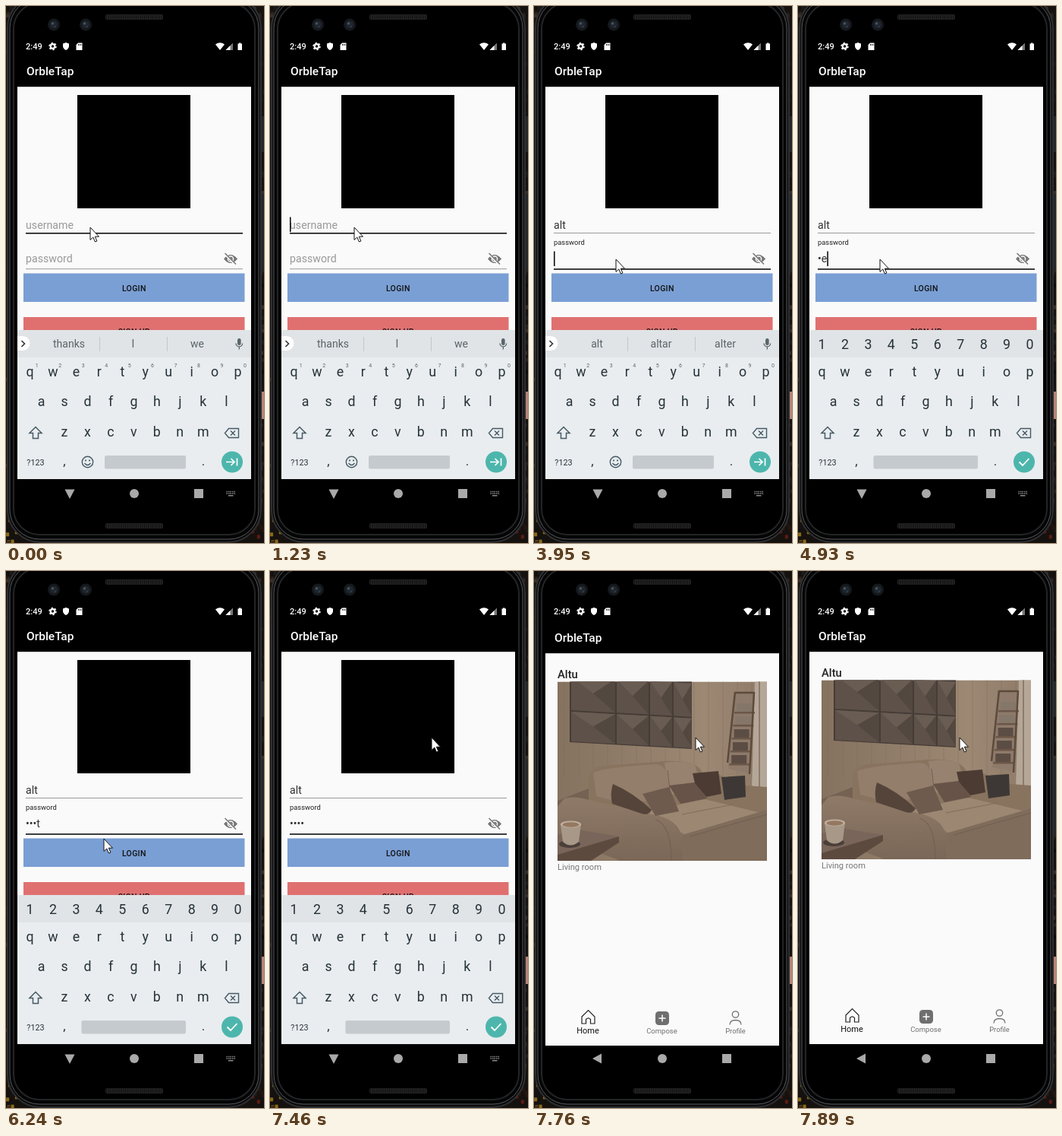
Animation, 340 px wide and 706 px high, one loop 8000 ms. Source, as an HTML page:

```html
<!DOCTYPE html>
<html lang="en">
<head>
<meta charset="utf-8">
<style>
html, body { margin: 0; width: 100%; height: 100%; overflow: hidden; background: #000; }
svg { display: block; width: 340px; height: 706px; font-family: Roboto, sans-serif; }
</style>
</head>
<body>
<svg id="stage" viewBox="0 0 340 706"></svg>
<script>
const LOOP = 8000;
const APP = 'OrbleTap', USER = 'Altu';
const stage = document.getElementById('stage');

const rect = (x, y, w, h, fill, more = '') =>
  `<rect x="${x}" y="${y}" width="${w}" height="${h}" fill="${fill}" ${more}/>`;
const circle = (x, y, r, fill, more = '') => `<circle cx="${x}" cy="${y}" r="${r}" fill="${fill}" ${more}/>`;
const ellipse = (x, y, rx, ry, fill) => `<ellipse cx="${x}" cy="${y}" rx="${rx}" ry="${ry}" fill="${fill}"/>`;
const path = (d, fill, more = '') => `<path d="${d}" fill="${fill}" ${more}/>`;
const line = (d, color, width = 1, more = '') =>
  path(d, 'none', `stroke="${color}" stroke-width="${width}" ${more}`);
const text = (x, y, size, str, fill, more = '') =>
  `<text x="${x}" y="${y}" font-size="${size}" fill="${fill}" ${more}>${str}</text>`;
const label = (x, y, size, str, fill, more = '') =>
  text(x, y, size, str, fill, `text-anchor="middle" ${more}`);
const group = (id, body) => `<g id="${id}">${body}</g>`;
const MEDIUM = 'font-weight="500"';

// Dark speckled wallpaper showing at the edges of the phone.
function wallpaper() {
  let seed = 7;
  const random = () => (seed = seed * 16807 % 2147483647) / 2147483647;
  const tones = ['#2b211b', '#0c0a09', '#3a2d25', '#1d1a1a'], warm = ['#8a6a16', '#3b2a12', '#5e1a14', '#241511'];
  return Array.from({ length: 320 }, (_, i) => {
    const right = i % 2, y = random() * 706;
    const tone = y > 650 ? warm[2 * right + (random() > .5)] : tones[Math.floor(random() * 4)];
    return rect((right ? 322 : 0) + random() * 16, y, 4, 5, tone);
  }).join('');
}

function phone() {
  const grille = y => rect(131, y, 76, 7, '#242424', 'rx="2"') +
    line(`M132 ${y + 3.5}H206`, '#101010', 6, 'stroke-dasharray="1 1.5"');
  const lens = x => circle(x, 24.5, 8, '#15181c') + circle(x, 24.5, 5, '#1f262e') +
    circle(x - 1.5, 23, 1.8, '#46535f') + circle(x + 2, 27, 1.2, '#323d48');
  return rect(0, 0, 340, 706, '#15110f') + wallpaper() +
    rect(335, 507, 5, 36, '#b78376') +
    rect(336, 145, 4, 47, '#24262a') + rect(336, 247, 4, 100, '#24262a') +
    rect(2, -14, 334, 719, '#0b0b0c', 'rx="43" stroke="#2e3032" stroke-width="2"') +
    rect(5, -10, 328, 711, '#050505', 'rx="39" stroke="#56585b"') +
    rect(10, -4, 318, 699, '#000', 'rx="34" stroke="#222426" stroke-width="2"') +
    grille(11) + grille(680) + lens(63) + lens(105);
}

function statusBar() {
  return text(26, 57.3, 11, '2:49', '#fff', MEDIUM) +
    circle(61.5, 53, 2.8, 'none', 'stroke="#fff" stroke-width="2.2"') +
    circle(61.5, 53, 4.5, 'none', 'stroke="#fff" stroke-width="1.5" stroke-dasharray="2.2 2.5"') +
    path('M79 48L83 49.6V53Q82.500 56.500 79 58Q75.500 56.500 75 53V49.600Z', '#fff') +
    path('M95 48.5H100.500V58H92.500V51Z', '#fff') +
    line('M95.500 50V52M97.200 50V52M99 50V52', '#000', .8) +
    path('M276 50.500Q282 46 288 50.500L282 58Z', '#fff') +
    path('M299 48.500V58H289.500Z', '#777') + path('M295.500 52V58H289.500Z', '#fff') +
    path('M305.500 49.500H307V48.500H309.500V49.500H311V58H305.500Z', '#fff');
}

const appWindow = () => rect(15, 67, 308, 39, '#000') + text(27, 91, 15.5, APP, '#fff', MEDIUM) +
  rect(15, 106, 308, 516, '#fafafa') + rect(15, 106, 308, 1, '#c9c9c9');

function login() {
  const eye = path('M287 332.500Q296 321.500 305 332.500Q296 343.500 287 332.500Z', '#757575') +
    circle(296, 332.5, 3.6, '#757575', 'stroke="#fafafa" stroke-width="1.5"') +
    line('M289 326.500L302.500 340', '#fafafa', 3) + line('M288.500 325L303 339.500', '#757575', 1.5);
  const button = (y, fill, str) => rect(23, y, 291.5, 37.5, fill) +
    label(168.8, y + 23, 10.5, str, '#111', MEDIUM + ' letter-spacing=".3"');
  return appWindow() + rect(94, 117, 149, 149, '#000') +
    text(26, 292.5, 14.2, '', '#333', 'id="name"') + text(26, 336.8, 14.2, '', '#333', 'id="pass"') +
    text(26, 336.8, 14.2, 'password', '#999', 'id="hint"') +
    rect(26, 294.5, 0, .8, '#333', 'id="composing"') +
    rect(26, 298, 286, 1, '#222', 'id="nameLine"') + rect(26, 345.2, 286, 1, '#222', 'id="passLine"') +
    rect(26, 277.5, 1.6, 19.5, '#111', 'id="caret"') + eye +
    button(351.5, '#7a9fd4', 'LOGIN') + button(409, '#e07070', 'SIGN UP') +
    rect(15, 101, 308, 521, '#000', 'id="dim" opacity="0"');
}

function keyboard() {
  const INK = '#263238', ICON = '#455a64';
  const row = (keys, x, y) => [...keys].map((k, i) => label(x + i * 30.45, y, 17.8, k, INK)).join('');
  const digits = '1234567890';
  const words = rect(15, 426, 308, 36, '#e0e4e7') +
    path('M15 434H22A9.500 9.500 0 0 1 22 453H15Z', '#fff') + line('M20.500 440L24.500 444L20.500 448', '#333', 1.6) +
    [83, 167.5, 252].map((x, i) => label(x, 449, 14, '', '#5a6468', `id="word${i}"`)).join('') +
    line('M123.500 435V454M212.500 435V454', '#c3c8cb') +
    rect(305, 437, 4.6, 9, '#59656a', 'rx="2.3"') + line('M303 443.500A4.300 4.300 0 0 0 311.600 443.500M307.300 448V451.500', '#59656a', 1.3) +
    [...digits].map((d, i) => label(40.8 + i * 30.45, 474.5, 7, d, '#59656a')).join('') +
    circle(107.5, 599.5, 7.2, 'none', `stroke="${ICON}" stroke-width="1.4"`) +
    circle(105, 597.5, 1.1, ICON) + circle(110, 597.5, 1.1, ICON) + line('M103.500 601Q107.500 606 111.500 601', ICON, 1.3) +
    rect(130, 591, 107, 17.5, '#c5cace', 'rx="2"');
  const numbers = rect(15, 426, 308, 36, '#e0e4e7') + row(digits, 31.5, 450.8) +
    rect(99.5, 591, 137.5, 17.5, '#c5cace', 'rx="2"');
  return rect(15, 426, 308, 196, '#e9edf0') + group('words', words) + group('numbers', numbers) +
    row('qwertyuiop', 31.5, 486.5) + row('asdfghjkl', 46.7, 526) + row('zxcvbnm', 77, 566) +
    line('M39 553.500L31 561.500H35.500V568.500H42.500V561.500H47Z', ICON, 1.5) +
    line('M293.500 555.500H306.500V567.500H293.500L288.500 561.500ZM296 558.500L302 564.500M302 558.500L296 564.500', ICON, 1.4) +
    label(39, 603.5, 10.8, '?123', INK) + label(77, 604, 17, ',', INK) + label(260, 604, 17, '.', INK) +
    circle(298, 599.5, 14, '#4db6ac') +
    line('M290 599.500H300.500M296.500 595L301 599.500L296.500 604M304.500 594.500V604.500', '#fff', 1.7, 'id="nextMark"') +
    line('M291.500 599.500L296 604L304.500 595', '#fff', 1.8, 'id="doneMark"');
}

function photo() {
  const columns = [[49, 107], [109, 151], [153, 182], [184, 208]];
  const slant = (y, x) => y + (x - 49) * .055;
  const panels = path('M47 143H208V232L47 223Z', '#463c36') + columns.map(([a, b]) => [[137, 181], [183, 222]].map(([y, y2]) => {
    const peak = `L${(a + b) / 2} ${slant((y + y2) / 2, a)}Z`;
    const tl = `${a} ${slant(y, a)}`, tr = `${b} ${slant(y, b)}`, br = `${b} ${slant(y2, b)}`, bl = `${a} ${slant(y2, a)}`;
    return path(`M${tl}L${tr}L${br}L${bl}Z`, '#5d5149') +
      path(`M${tl}L${tr}${peak}`, '#695c53') + path(`M${tr}L${br}${peak}`, '#53483f');
  }).join('')).join('');
  const planks = Array.from({ length: 14 }, (_, i) => `M${40 + i * 19} 143V270`).join('');
  const shelves = [0, 1, 2, 3, 4].map(i => {
    const x = 264 - i * 1.7, y = 183 + i * 17;
    return rect(x + 3, y - 11, 20, 11, i > 1 ? '#5c4d44' : '#85766a') + rect(x, y, 27, 2.5, '#6b5647');
  }).join('');
  const room = rect(31, 143.5, 276, 235.5, 'url(#wall)') + line(planks, '#806c59', .8, 'opacity=".5"') +
    panels + path('M291 143H307V285H287Z', '#b5a798') + line('M297 143V282', '#8d7b6b', 2) +
    path('M264 157H290L285 264L256 258Z', '#8d7a6a') + shelves +
    line('M265 157L255 250M290 157L284 265M265 158H290', '#5d4a3b', 2.5);
  const sofa = path('M31 300L72 284V310L31 340Z', '#766252') +
    path('M72 270Q74 256 92 254L160 249Q174 247 188 248Q214 248 222 263L244 266L280 280L307 282V379H110L72 300Z', '#88735f') +
    path('M172 250Q196 246 212 252L222 290L178 292Z', '#978270') +
    path('M78 264Q84 257 160 252Q170 252 174 262L178 296L120 304L82 294Z', '#937d6b') +
    path('M145 315L225 298L307 318V335L220 356Z', '#9c8773') + path('M195 345L307 312V379H196Z', '#806c5b') +
    path('M40 297Q54 293 72 299L165 320Q193 328 195 350L196 379H114L31 348V308Z', 'url(#arm)') +
    line('M160 325Q181 331 181 379M176 260L180 294M205 347L307 318', '#715e50') + line('M195 318L262 305', '#806c5b');
  const pillows = path('M104 278Q130 289 155 312Q151 320 142 317L103 304Q100 290 104 278Z', '#55443a') +
    path('M143 291L178 282L191 314L160 320Z', '#6f5b4e') + path('M178 280L212 276L228 297L193 304Z', '#675347') +
    path('M209 264L243 261L247 291L227 295L212 277Z', '#4b3b33') + path('M247 269L278 267L279 295L251 299Z', '#3d3835');
  const table = path('M31 345L58 338L112 347L72 379H31Z', '#79655a') + path('M31 371L112 347V355L75 379H31Z', '#5d4a3f') +
    ellipse(47, 357, 14, 5, '#4b3f39') + path('M35 331H62L59 354Q48 363 38 354Z', '#a89888') +
    ellipse(48.5, 331, 13.5, 4.5, '#c0b1a1') + ellipse(48.5, 331.5, 11, 3.2, '#94785f');
  return `<g clip-path="url(#frame)">${room + sofa + pillows + table}</g>`;
}

function home() {
  const GREY = '#6f6f6f';
  return appWindow() + text(31, 138.8, 14.8, USER, '#222', MEDIUM) + photo() + text(31, 391, 11.1, 'Living room', '#777') +
    line('M63 584L71.500 575.500L80 584V593H74.500V587.500Q71.500 584.500 68.500 587.500V593H63Z', '#222', 1.2) +
    label(71, 606, 11, 'Home', '#111') +
    rect(160, 577, 18, 18, GREY, 'rx="4.500"') + line('M169 581.500V590.500M164.500 586H173.500', '#fff', 1.5) +
    label(168.5, 606, 9.5, 'Compose', GREY) +
    circle(265.5, 581, 4.2, 'none', `stroke="${GREY}" stroke-width="1.3"`) +
    line('M258 594.500Q258 588.500 265.500 588.500Q273 588.500 273 594.500', GREY, 1.3) + label(265.5, 606, 9.3, 'Profile', GREY);
}

const navBar = () => path('', '#a9a9a9', 'id="back"') + circle(169, 641, 6, '#a9a9a9') + rect(248, 635, 12, 12, '#a9a9a9') +
  group('switcher', line('M290.500 638.500H302M290.500 641H302', '#8c8c8c', 1.5, 'stroke-dasharray="1.5 1"') +
    line('M293 643.700H299.500', '#8c8c8c', 1.5));

stage.innerHTML = `<defs>
  <linearGradient id="wall"><stop stop-color="#85725f"/><stop offset=".7" stop-color="#9c8873"/><stop offset="1" stop-color="#8e7a68"/></linearGradient>
  <linearGradient id="arm" x2="0" y2="1"><stop stop-color="#8f7a68"/><stop offset="1" stop-color="#7b6757"/></linearGradient>
  <clipPath id="frame">${rect(31, 143.5, 276, 235.5, '#000')}</clipPath>
  <clipPath id="reveal">${rect(15, 0, 308, 706, '#000', 'id="revealBox"')}</clipPath></defs>` +
  phone() + navBar() + group('old', login()) + `<g id="fresh" clip-path="url(#reveal)">${group('slide', home())}</g>` +
  group('keys', keyboard()) + statusBar() +
  path('M0 0V16.500L3.800 13L6.400 19L8.900 18L6.300 12.200H11.500Z', '#fff', 'id="pointer" stroke="#111"');

const ui = Object.fromEntries([...stage.querySelectorAll('[id]')].map(e => [e.id, e]));
const set = (el, attrs) => Object.entries(attrs).forEach(([k, v]) => el.setAttribute(k, v));
const show = (el, on) => el.setAttribute('visibility', on ? 'visible' : 'hidden');
// Latest [time, value] step that has begun.
const at = (t, steps) => steps.filter(s => s[0] <= t).pop()[1];

const caretOn = [[400, 960], [1110, 1950], [2090, 3020], [3540, 4410], [4810, 5940], [6390, 6910]];
const names = [[0, ''], [2090, 'a'], [2340, 'al'], [2460, 'alt']];
const secrets = [[0, ''], [4810, 't'], [4930, '•e'], [5230, '••s'], [5350, '•••t'], [6910, '••••']];
const guesses = [[0, ['thanks', 'I', 'we']], [2090, ['a', 'and', 'at']],
  [2340, ['al', 'all', 'already']], [2460, ['alt', 'altar', 'alter']]];
const hints = [[0, { y: 336.8, 'font-size': 14.2, fill: '#999' }],
  [3820, { y: 324, 'font-size': 11.5, fill: '#666' }], [3950, { y: 314, 'font-size': 9.4, fill: '#222' }]];
const pointerPath = [[0, [111, 291]], [3270, [110, 298]], [3390, [109, 312]], [3540, [108, 333]],
  [6240, [129, 352]], [6390, [143, 362]], [6510, [146, 365]], [6910, [145, 365]], [7310, [163, 317]], [7460, [213, 219]]];
const opening = [[0, { slide: 0, top: 706, lift: 0, dim: 0, keys: 1 }], [7610, { slide: 14, top: 136, lift: -5, dim: .1, keys: .72 }],
  [7760, { slide: 2, top: 60, lift: -5, dim: .1, keys: 0 }], [7890, { slide: 0, top: 0, lift: 0, dim: 0, keys: 0 }]];

function render(t) {
  const onPass = t >= 3820, numeric = t >= 4100, opened = t >= 7610;
  const name = at(t, names), secret = at(t, secrets);
  ui.name.textContent = name || 'username';
  set(ui.name, { fill: name ? '#333' : '#999' });
  ui.pass.textContent = secret;
  set(ui.hint, at(t, hints));

  const field = onPass ? ui.pass : ui.name;
  const typed = (onPass ? secret : name) ? field.getComputedTextLength() : 0;
  set(ui.caret, { x: 26 + typed, y: onPass ? 322.5 : 277.5 });
  show(ui.caret, caretOn.some(([a, b]) => t >= a && t < b));
  set(ui.composing, { width: onPass ? 0 : typed });
  const underline = on => ({ height: on ? 1.6 : 1, fill: on ? '#111' : '#999' });
  set(ui.nameLine, underline(!onPass));
  set(ui.passLine, underline(onPass));

  at(t, guesses).forEach((w, i) => ui['word' + i].textContent = w);
  show(ui.words, !numeric);
  show(ui.nextMark, !numeric);
  show(ui.numbers, numeric);
  show(ui.doneMark, numeric);

  const { slide, top, lift, dim, keys } = at(t, opening);
  show(ui.fresh, opened);
  show(ui.switcher, !opened);
  set(ui.back, { d: opened ? 'M77 641L89 634.500V647.500Z' : 'M77.500 635.500H90.500L84 648Z' });
  set(ui.slide, { transform: `translate(0 ${slide})` });
  set(ui.revealBox, { y: top });
  set(ui.old, { transform: `translate(0 ${lift})` });
  set(ui.dim, { opacity: dim });
  set(ui.keys, { opacity: keys, transform: `translate(0 ${slide})` });
  set(ui.pointer, { transform: `translate(${at(t, pointerPath)})` });
}

const start = performance.now();
function tick() {
  render((performance.now() - start) % LOOP);
  requestAnimationFrame(tick);
}
tick();
</script>
</body>
</html>
```
